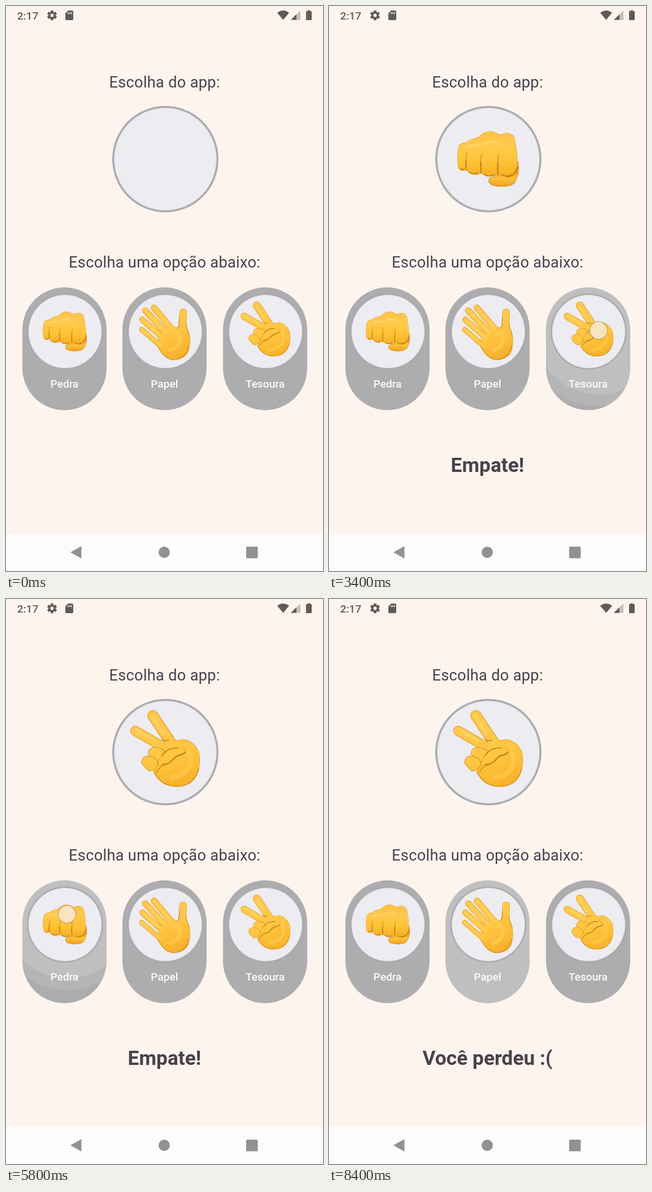
Write an HTML page with a canvas that moves like this. It is 561 px wide and 998 px high and loops after 8.5 s.

```html
<!DOCTYPE html>
<html lang="pt">
<head>
<meta charset="utf-8">
<title>Pedra, papel, tesoura</title>
<style>
html, body { margin: 0; width: 100%; height: 100%; overflow: hidden; background: #fef4ee; }
canvas { display: block; width: 561px; height: 998px; }
</style>
</head>
<body>
<canvas id="stage" width="561" height="998"></canvas>
<script>
const ctx = document.getElementById('stage').getContext('2d');
const LOOP = 8500, STEP = 100;
const BG = '#fef4ee', INK = '#46434d', STATUS = '#5f5b5b', NAV = '#929092';
const EDGE = '#e29a24', CREASE = '#c57c14';

const cards = [
  { x: 103.5, discX: 104.5, label: 'Pedra', sign: drawRock },
  { x: 280.5, discX: 282, label: 'Papel', sign: drawPaper },
  { x: 458.5, discX: 459.5, label: 'Tesoura', sign: drawScissors }
];

// Ripple stages: radius, strength, finger on screen
const phases = {
  press: { r: 72, power: 0.5, touch: true },
  spread: { r: 113, power: 1, touch: true },
  full: { r: 260, power: 1 },
  fade: { r: 260, power: 0.5 }
};
const taps = [
  { at: 1400, card: 0, x: 108, y: 570, app: drawRock, result: 'Empate!', steps: ['press', 'press', 'full', 'fade'] },
  { at: 3400, card: 2, x: 477, y: 573, app: drawScissors, result: 'Empate!', steps: ['spread', 'full', 'fade'] },
  { at: 5700, card: 0, x: 108, y: 557, app: drawPaper, result: 'Você perdeu :(', steps: ['press', 'spread', 'full', 'fade'] },
  { at: 8100, card: 1, x: 284, y: 570, app: drawScissors, result: 'Você perdeu :(', steps: ['press', 'spread', 'full', 'full'] }
];

function fill(path, color) {
  ctx.fillStyle = color;
  ctx.fill(typeof path === 'string' ? new Path2D(path) : path);
}

function line(d, color, width) {
  ctx.strokeStyle = color;
  ctx.lineWidth = width;
  ctx.stroke(new Path2D(d));
}

function disc(x, y, r, color) {
  ctx.beginPath();
  ctx.arc(x, y, r, 0, Math.PI * 2);
  ctx.fillStyle = color;
  ctx.fill();
}

function text(str, x, y, size, weight, color, spacing = 0) {
  ctx.font = `${weight} ${size}px Roboto, sans-serif`;
  ctx.letterSpacing = spacing + 'px';
  ctx.textAlign = 'center';
  ctx.fillStyle = color;
  ctx.fillText(str, x + spacing / 2, y);
}

function gradient(x1, y1, x2, y2, ...colors) {
  const g = ctx.createLinearGradient(x1, y1, x2, y2);
  colors.forEach((c, i) => g.addColorStop(i / (colors.length - 1), c));
  return g;
}

// Joins limbs [path, width] and solid bodies [path] under one outline
function flesh(parts, skin, edge = EDGE) {
  for (const [d, w] of parts) {
    if (!w) fill(d, edge);
    line(d, edge, (w || 0) + 1.4);
  }
  for (const [d, w] of parts) {
    if (w) line(d, skin, w - 0.8);
    else fill(d, skin);
  }
}

function drawRock() {
  flesh([['M284 305 C281 312 286 317 298 318 C312 319 324 318 329 311 C334 301 337 291 334 275 L312 292 Z']],
    gradient(0, 292, 0, 318, '#e79b1d', '#ffc13a', '#eda21f'), CREASE);
  flesh([['M230 249 C231 243 238 242 244 241 C249 235 258 235 265 232 C271 227 276 222 286 222 ' +
    'C294 222 298 227 304 228 C313 223 325 224 328 234 C331 248 333 266 333 280 C332 290 327 299 317 300 ' +
    'C309 301 303 299 299 295 C292 302 274 301 269 294 C263 300 249 298 243 289 C237 292 229 290 229 283 ' +
    'C227 272 228 259 230 249 Z']],
    gradient(0, 222, 0, 302, '#ffc247', '#ffca4d', '#ffc334', '#f5ae25'));
  for (const [x, y, bottom] of [[243, 260, 289], [269, 262, 295], [299, 263, 296]]) {
    line(`M${x + 1} ${y} Q${x - 2} ${y + 16} ${x} ${bottom}`, '#e7a02b', 2.4);
    line(`M${x} ${y + 14} Q${x - 1} ${y + 23} ${x} ${bottom}`, CREASE, 1.8);
  }
  for (const [x, y, w] of [[233, 287, 6], [249, 294, 14], [275, 298, 17], [306, 298, 16]])
    line(`M${x} ${y} q${w / 2} 5 ${w} 0`, CREASE, 1.7);
  line('M247 249 Q258 242 266 248 M273 244 Q287 235 298 244', 'rgba(255,220,110,.7)', 4);
  line('M333 284 C331 296 324 301 315 302', CREASE, 1.6);
}

function drawPaper() {
  const fingers = ['M254 212 L299 265', 'M232.5 219 L285 275', 'M225 241 L278 288', 'M223.5 265.5 L270 306'];
  const widths = [14.5, 14.5, 13.5, 11.5];
  const skin = gradient(255, 215, 315, 340, '#ffc549', '#ffc94d', '#ffbf3a', '#f6ae29');
  flesh([
    ...fingers.map((d, i) => [d, widths[i]]),
    ['M326 223 C325 238 325 250 323 264', 17],
    ['M294 249 C301 257 307 262 312 261 C316 257 317 248 317 238 L334.5 232 C333 248 333 259 338 268 ' +
     'C344 281 344 302 339 319 C333 334 317 341 299 340 C284 338 273 326 264 309 L265 285 Z']
  ], skin);
  fingers.forEach(d => line(d, 'rgba(255,215,103,.45)', 5));
  line('M339 306 C337 329 319 340 299 340 C284 338 273 326 263 307', '#d98b1b', 1.7);
  line('M317 238 C317 250 316 259 311 262', CREASE, 1.4);
  line('M333 249 C333 260 338 268 341 280', CREASE, 1);
  line('M303 275 C309 271 316 271 318 286 C318 304 308 314 293 317', 'rgba(255,211,91,.5)', 9);
}

function drawScissors() {
  const skin = gradient(265, 230, 305, 330, '#ffc84c', '#ffc640', '#f9b329');
  flesh([['M229 233 L286 266', 16.5], ['M260 206 L294 257', 18],
    ['M278 264 C281 251 295 248 307 250 C319 245 335 255 341 271 C345 290 341 309 330 321 ' +
     'C319 332 296 334 281 326 C270 321 264 309 260 298 Z']], skin);
  line('M230 231 L263 250 M259 207 L278 237', 'rgba(255,217,108,.6)', 5);
  line('M276 247 Q280 252 288 249', CREASE, 1.4);
  line('M341 300 C336 321 321 331 302 331 C287 331 272 325 262 306', '#dd911f', 1.7);
  flesh([['M252 274 C251 265 259 261 268 263 C278 264 284 270 280 279 C277 287 268 289 263 286 Z']], skin, CREASE);
  flesh([['M241 291 C239 281 246 276 254 278 C263 280 270 285 268 292 C266 301 259 304 252 303 Z']], skin, CREASE);
  flesh([['M270 288 C274 276 282 266 296 264 C306 263 319 263 318 269 C318 275 306 272 299 278 ' +
    'C293 283 291 290 283 292 C276 295 267 296 270 288 Z']], skin, '#dd911f');
  line('M277 292 C289 293 293 286 299 280 C305 275 313 276 318 270', CREASE, 2);
  line('M277 276 C283 266 293 263 304 263', CREASE, 1.6);
  line('M266 306 C270 300 273 295 280 294', '#d88a18', 1.6);
  line('M322 270 C334 290 322 312 293 315', 'rgba(255,210,90,.45)', 8);
}

function choice(x, y, scale, sign) {
  ctx.save();
  ctx.translate(x, y);
  ctx.scale(scale, scale);
  disc(0, 0, 94, '#aaa9ab');
  disc(0, 0, 91, '#c9c8cb');
  disc(0, 0, 90, '#edecf0');
  ctx.translate(-282, -270.5);
  ctx.lineCap = ctx.lineJoin = 'round';
  if (sign) sign();
  ctx.restore();
}

function drawCard(card, tap, phase) {
  ctx.save();
  ctx.beginPath();
  ctx.roundRect(card.x - 74.5, 497, 149, 217, 74.5);
  ctx.fillStyle = '#adacae';
  ctx.fill();
  if (phase) {
    ctx.clip();
    disc(tap.x, tap.y, phase.r * 1.18, `rgba(255,255,255,${0.1 * phase.power})`);
    disc(tap.x, tap.y, phase.r, `rgba(255,255,255,${0.13 * phase.power})`);
  }
  ctx.restore();
  choice(card.discX, 575, 1 / 1.4, card.sign);
  text(card.label, card.x, 673.5, 19.1, 500, '#fefafa');
}

function drawStatusBar() {
  text('2:17', 38.5, 24, 19.1, 500, STATUS);
  ctx.save();
  ctx.translate(81.5, 16.5);
  disc(0, 0, 6.5, STATUS);
  for (let i = 0; i < 3; i++) {
    ctx.fillRect(-2.4, -8.6, 4.8, 17.2);
    ctx.rotate(Math.PI / 3);
  }
  disc(0, 0, 2.9, BG);
  ctx.restore();

  fill('M110 8 H117 Q119 8 119 10 V23 Q119 25 117 25 H107 Q105 25 105 23 V13 Z', STATUS);
  ctx.fillStyle = BG;
  for (const x of [109.3, 112.2, 115.1]) ctx.fillRect(x, 11, 1.5, 3.2);
  fill('M480 12 Q490.5 4 501 12 L490.5 24.5 Z', STATUS);
  fill('M521 8 V24.5 H504 Z', '#c5bdb9');
  fill('M514 14.8 V24.5 H504 Z', STATUS);
  fill('M534 7.5 H538 V9 H540 Q541 9 541 10 V24 Q541 25 540 25 H532 Q531 25 531 24 V10 Q531 9 532 9 H534 Z', STATUS);
}

function drawNavBar() {
  ctx.fillStyle = '#fefbfe';
  ctx.fillRect(0, 932, 561, 66);
  fill('M114 965 L133.5 954 V976 Z', NAV);
  disc(280, 965, 10, NAV);
  ctx.beginPath();
  ctx.roundRect(425, 955, 20.5, 20.5, 1.5);
  ctx.fill();
}

function stateAt(time) {
  const state = { app: null, result: '' };
  for (const tap of taps) {
    if (time < tap.at) break;
    const step = Math.floor((time - tap.at) / STEP);
    if (step >= tap.steps.indexOf('full')) {
      state.app = tap.app;
      state.result = tap.result;
    }
    state.tap = tap;
    state.phase = phases[tap.steps[step]];
  }
  return state;
}

function render(time) {
  const { app, result, tap, phase } = stateAt(time);
  ctx.fillStyle = BG;
  ctx.fillRect(0, 0, 561, 998);
  drawStatusBar();
  text('Escolha do app:', 280.5, 143.5, 27.3, 400, INK, 0.25);
  choice(282, 270.5, 1, app);
  text('Escolha uma opção abaixo:', 280.5, 461.5, 27.3, 400, INK, 0.25);
  cards.forEach((card, i) => drawCard(card, tap, tap && tap.card === i ? phase : null));
  if (phase && phase.touch) {
    disc(tap.x, tap.y, 16.5, 'rgba(176,150,105,.6)');
    disc(tap.x, tap.y, 15, 'rgba(255,238,208,.85)');
  }
  if (result) text(result, 280.5, 822.5, 35.3, 700, INK);
  drawNavBar();
}

const start = performance.now();
function tick() {
  render((performance.now() - start) % LOOP);
  requestAnimationFrame(tick);
}
tick();
</script>
</body>
</html>
```
